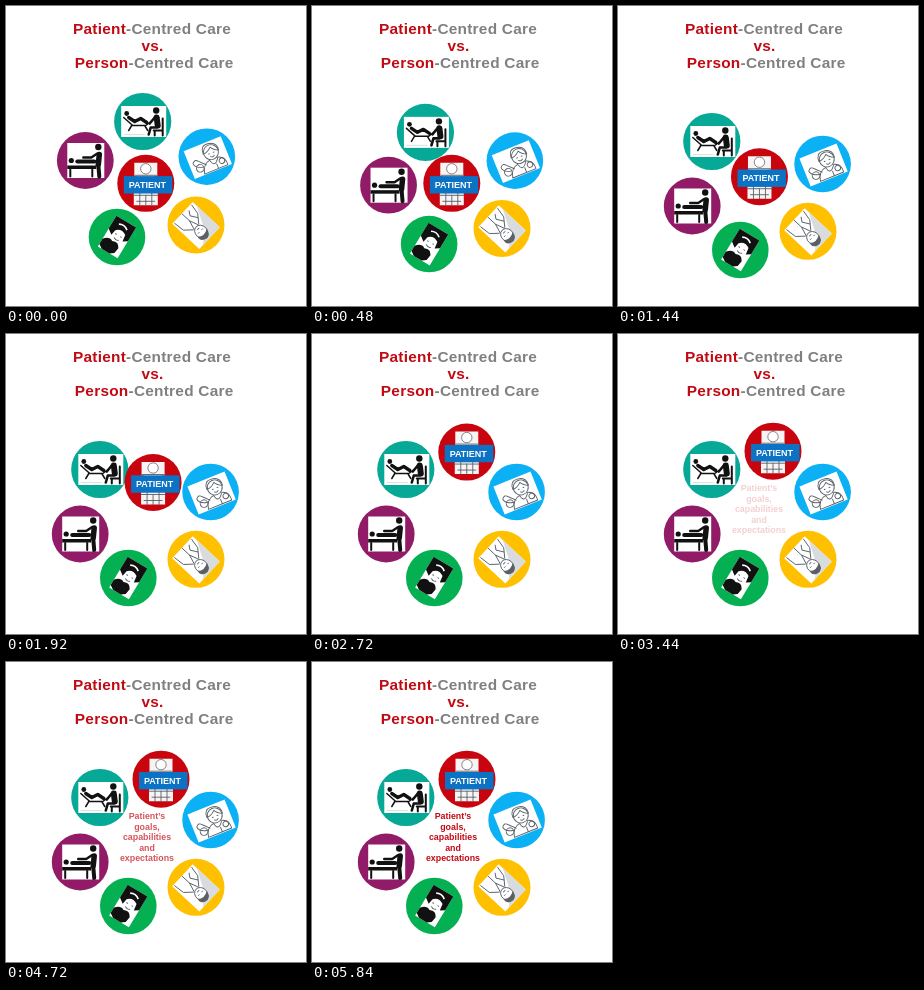
Write an HTML page that moves like this. It is 300 by 300 pixels and loops after 5.92 s.

```html
<!DOCTYPE html>
<html lang="en">
<head>
<meta charset="utf-8">
<title>Patient-Centred Care vs. Person-Centred Care</title>
<style>
  html, body { margin: 0; width: 100%; height: 100%; overflow: hidden; background: #fff; }
  svg { display: block; width: 100%; height: 100%; }
  text { font-family: "Liberation Sans", Arial, sans-serif; font-weight: bold; text-anchor: middle; }
  .title { font-size: 15.4px; letter-spacing: .25px; fill: #808080; }
  .title .red, #goals { fill: #c20a14; }
  #goals { font-size: 8.85px; }
  .line { fill: none; stroke: #111; stroke-linecap: round; stroke-linejoin: round; }
  .thin { fill: none; stroke: #586068; stroke-width: .9; stroke-linecap: round; stroke-linejoin: round; }
  .paper { fill: #fff; }
  .ink { fill: #111; }
</style>
</head>
<body>
<svg viewBox="0 0 300 300">
  <rect width="300" height="300" fill="#fff"/>
  <g class="title">
    <text x="146" y="28.3"><tspan class="red">Patient</tspan>-Centred Care</text>
    <text x="146.5" y="45.3" class="red">vs.</text>
    <text x="148.2" y="62.3"><tspan class="red">Person</tspan>-Centred Care</text>
  </g>

  <g id="couch">
    <circle r="28.6" fill="#06a896"/>
    <g transform="translate(1 0)">
      <rect class="paper" x="-22.5" y="-15.5" width="45" height="31"/>
      <circle class="ink" cx="-17" cy="-8" r="2.4"/>
      <path class="line" stroke-width="3.4" d="M-15-4 L-9 0 L-3-3 L3 1"/>
      <path class="line" stroke-width="1.5" d="M-20-4 L-11 4 H2 L6 1 M-12 4 L-15 9 M1 4 L4 9"/>
      <circle class="ink" cx="12.5" cy="-11" r="3.2"/>
      <path class="line" stroke-width="6" d="M13-4 L14 4"/>
      <path class="line" stroke-width="2.6" d="M11-4 L6 2 M13 6 L7 6 L5 13"/>
      <path class="line" stroke-width="2" d="M19-3 V14 M10 9 H19 M11 9 V14"/>
      <path d="M-20 13 H1" stroke="#cfd8d8" stroke-width=".8"/>
    </g>
  </g>

  <g id="bed">
    <circle r="28.4" fill="#921b68"/>
    <rect class="paper" x="-18" y="-17.5" width="37" height="35"/>
    <circle class="ink" cx="13" cy="-13.5" r="3.2"/>
    <path class="line" stroke-width="5.5" d="M14-6 L13 4"/>
    <path class="line" stroke-width="4" d="M13 4 L14 16"/>
    <path class="line" stroke-width="2.4" d="M12-7 L6-3 L-2-3"/>
    <circle class="ink" cx="-14" cy="0" r="2.6"/>
    <path class="line" stroke-width="4" d="M-8 1 H9"/>
    <path class="ink" d="M-18 5 H11 V8.5 H-18z"/>
    <path class="line" stroke-width="2" d="M-15 9 V16 M7 9 V16"/>
  </g>

  <g id="heads">
    <circle r="28.3" fill="#04b052"/>
    <g transform="rotate(31)">
      <rect class="paper" x="-11.5" y="-18" width="23" height="36"/>
      <path class="ink" d="M-11.5-18 H11.5 V-2 L7 1 L6-6 Q0-10-5-5 L-6 1 L-11.5-3z"/>
      <path class="ink" d="M-11.5 9 Q-7 3-2 6 Q4 3 7 9 L6 15 L2 18 H-7 L-11.5 15z"/>
      <path d="M-5-12 Q0-15 5-11" fill="none" stroke="#fff" stroke-width="1.6"/>
      <path class="thin" d="M-3-2 h1 M3-2 h1 M-2 2 Q1 4 3 2"/>
    </g>
  </g>

  <g id="doctor">
    <circle r="28.5" fill="#ffc000"/>
    <g transform="translate(0 .5) rotate(43)">
      <rect class="paper" x="-18.5" y="-15" width="37" height="30"/>
      <path d="M-13-15 H18.5 V10 L10-2z" fill="#d9dcdf"/>
      <ellipse cx="8" cy="1" rx="7" ry="6" fill="#fff" stroke="#586068" stroke-width=".9"/>
      <path d="M10-5 Q19-3 16 4 Q14 9 9 7 Q14 2 10-5z" fill="#5c6064"/>
      <path class="thin" d="M1-3 L-7-10 L-17-12 M1 5 L-6 12 L-17 13 M1-2 L-8 1 L1 4 M-8 1 H-18 M-4-7 L-11-3 L-15-6 M7-2 v1 M7 3 v1 M4 0 Q3 1 4 2"/>
    </g>
  </g>

  <g id="child">
    <circle r="28.3" fill="#0cb0f4"/>
    <g transform="translate(1 1) rotate(-22)">
      <rect class="paper" x="-20" y="-15" width="40" height="30"/>
      <circle class="thin" cx="5" cy="-4" r="7.5"/>
      <path class="thin" d="M-3-5 Q-3-14 5-13 Q14-12 13-3 Q8-5 6-9 Q2-5-3-5 M2-3 h1 M7-3 h1 M3 0 Q5 2 7 0"/>
      <path class="thin" d="M1 3 Q-7 4-9 14 H16 Q17 5 9 3 M-8 7 Q-16 5-16 0 Q-13-4-10 0 L-4 6 M1 4 Q3 12 9 4 M6 9 V14"/>
      <circle class="thin" cx="-11" cy="7" r="3.8"/>
      <circle class="thin" cx="12" cy="8" r="2.8"/>
    </g>
  </g>

  <g id="patient">
    <circle r="28.5" fill="#c8040e"/>
    <path d="M-11.5-20.5 H11.5 V-7 H9 V9 H12 V22 H-12 V9 H-9 V-7 H-11.5z" fill="#f8f4f4"/>
    <circle cx="0" cy="-14.5" r="5.2" fill="#fff" stroke="#777" stroke-width=".9"/>
    <path class="thin" d="M-11-8 H11 M-6 9 V22 M6 9 V22 M0 12 V22 M-12 12 H12 M-9 18 H9"/>
    <g transform="translate(2 1.5)">
      <rect x="-24" y="-8.7" width="48.5" height="17.4" fill="#0b72c4"/>
      <text x="-.5" y="3.2" font-size="9" fill="#fff">PATIENT</text>
    </g>
  </g>

  <g id="goals"></g>
</svg>
<script>
const LOOP = 5920, STEP = 80;

// Each badge glides from one place to another within its time span (ms).
const SPREAD = [0, 920], RISE = [1000, 2880], FADE = [2960, 5500];
const badges = {
  couch:   { span: SPREAD, from: [136.7, 115.5], to: [93.8, 135.5] },
  bed:     { span: SPREAD, from: [79.3, 154.5],  to: [74.2, 200] },
  heads:   { span: SPREAD, from: [111, 231],     to: [122.3, 244] },
  doctor:  { span: SPREAD, from: [190, 219],     to: [190, 225.3] },
  child:   { span: SPREAD, from: [200.8, 150.7], to: [204.6, 158] },
  patient: { span: RISE,   from: [139.8, 177.3], to: [155, 117.2] }
};

const byId = id => document.getElementById(id);
const progress = (t, [start, end]) => Math.min(1, Math.max(0, (t - start) / (end - start)));
const easeInOut = u => u < .5 ? 2 * u * u : 1 - 2 * (1 - u) ** 2;

byId('goals').innerHTML = ['Patient’s', 'goals,', 'capabilities', 'and', 'expectations']
  .map((line, i) => `<text x="141" y="${157 + i * 10.5}">${line}</text>`).join('');

function draw(t) {
  for (const [id, { span, from, to }] of Object.entries(badges)) {
    const u = easeInOut(progress(t, span));
    const [x, y] = from.map((v, i) => v + (to[i] - v) * u);
    byId(id).setAttribute('transform', `translate(${x} ${y})`);
  }
  byId('goals').setAttribute('opacity', progress(t, FADE));
}

const began = performance.now();
function tick() {
  const t = (performance.now() - began) % LOOP;
  draw(Math.floor(t / STEP) * STEP);
  requestAnimationFrame(tick);
}
tick();
</script>
</body>
</html>
```
